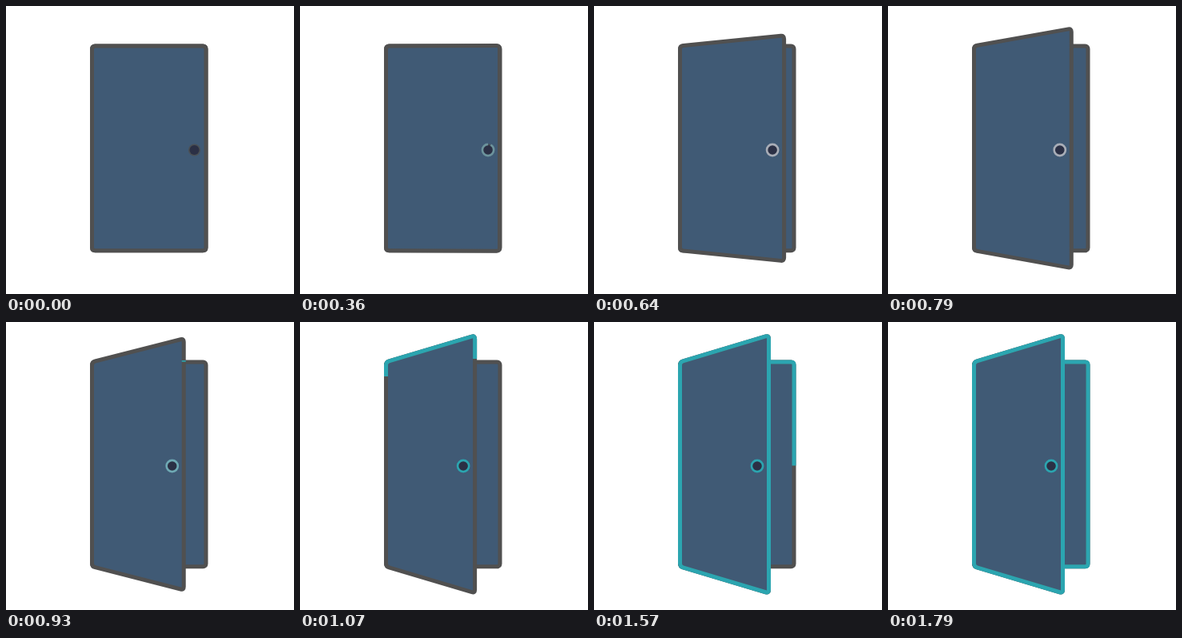
These frames come from a looping animation (360x360 px, 1870 ms). An HTML page:

```html
<!DOCTYPE html>
<html lang="en">
<head>
<meta charset="utf-8">
<title>Door</title>
<style>
  html, body { margin: 0; width: 100%; height: 100%; overflow: hidden; background: #fff; }
  svg { display: block; width: 100vw; height: 100vh; }
  path, circle { stroke-linejoin: round; }
  .panel { fill: #405a75; stroke: #505050; stroke-width: 5; }
  .trace { fill: none; stroke: #2ba5b0; stroke-width: 5; }
  .ring { fill: none; stroke-width: 2.6; }
</style>
</head>
<body>
<svg viewBox="0 0 360 360">
  <rect class="panel" x="107.5" y="50" width="142.5" height="255.7" rx="3.5"/>
  <path id="backTrace" class="trace" pathLength="1"
        d="M219 50H246.5Q250 50 250 53.5V302.2Q250 305.7 246.5 305.7H219"/>
  <path id="door" class="panel"/>
  <path id="doorTrace" class="trace" pathLength="1"/>
  <g id="knob">
    <circle r="7.6" fill="#4b5054"/>
    <circle r="6" fill="#2b3045"/>
    <path id="ring" class="ring" pathLength="1" d="M0 -7.1A7.1 7.1 0 0 0 0 7.1A7.1 7.1 0 0 0 0 -7.1"/>
  </g>
</svg>
<script>
const LOOP = 1870, FPS = 14, STEPS = 26;
const HINGE = 107.5, TOP = 50, BOTTOM = 305.7, RADIUS = 4;
const $ = id => document.getElementById(id);
const lerp = (a, b, p) => a + (b - a) * p;
const clamp = x => Math.min(1, Math.max(0, x));

// Eased progress between two times in seconds.
function ease(t, from, to) {
  const x = clamp((t - from) / (to - from));
  return x * x * (3 - 2 * x);
}

function mix(a, b, p) {
  return `rgb(${a.map((v, i) => Math.round(lerp(v, b[i], p)))})`;
}

function reveal(el, p) {
  el.style.visibility = p > 0 ? 'visible' : 'hidden';
  el.setAttribute('stroke-dasharray', p < 1 ? `${p} 2` : 'none');
}

// Rounded outline, starting on the free edge and running up and to the left.
function doorPath(open) {
  const x = lerp(250, 218.5, open), rise = 33.2 * open;
  const corners = [[x, TOP - rise], [HINGE, TOP], [HINGE, BOTTOM], [x, BOTTOM + rise]];
  const start = [x, TOP - rise + 29];
  const toward = (a, b) => {
    const k = RADIUS / Math.hypot(b[0] - a[0], b[1] - a[1]);
    return [lerp(a[0], b[0], k), lerp(a[1], b[1], k)];
  };
  const parts = corners.map((c, i) => {
    const prev = corners[(i + 3) % 4], next = corners[(i + 1) % 4];
    return `L${toward(c, prev)}Q${c} ${toward(c, next)}`;
  });
  return `M${start}${parts.join('')}Z`;
}

const TEAL = [43, 165, 176], MIST = [108, 147, 156], SILVER = [168, 173, 183];

function draw(ms) {
  const step = Math.min(STEPS - 1, Math.floor((ms + 6) * FPS / 1000));
  const t = step / FPS;
  const open = ease(t, 0.3, 1.1);
  const d = doorPath(open);
  $('door').setAttribute('d', d);
  $('doorTrace').setAttribute('d', d);
  reveal($('doorTrace'), ease(t, 0.914, 1.464));
  reveal($('backTrace'), ease(t, 1.36, 1.78));

  $('knob').setAttribute('transform', `translate(${lerp(235.5, 204, open)} 180)`);
  reveal($('ring'), ease(t, 0, 0.43));
  $('ring').style.stroke = t < 0.8
    ? mix(MIST, SILVER, ease(t, 0.36, 0.64))
    : mix(SILVER, TEAL, ease(t, 0.8, 1.07));
}

function tick() {
  draw(performance.now() % LOOP);
  requestAnimationFrame(tick);
}
tick();
</script>
</body>
</html>
```
